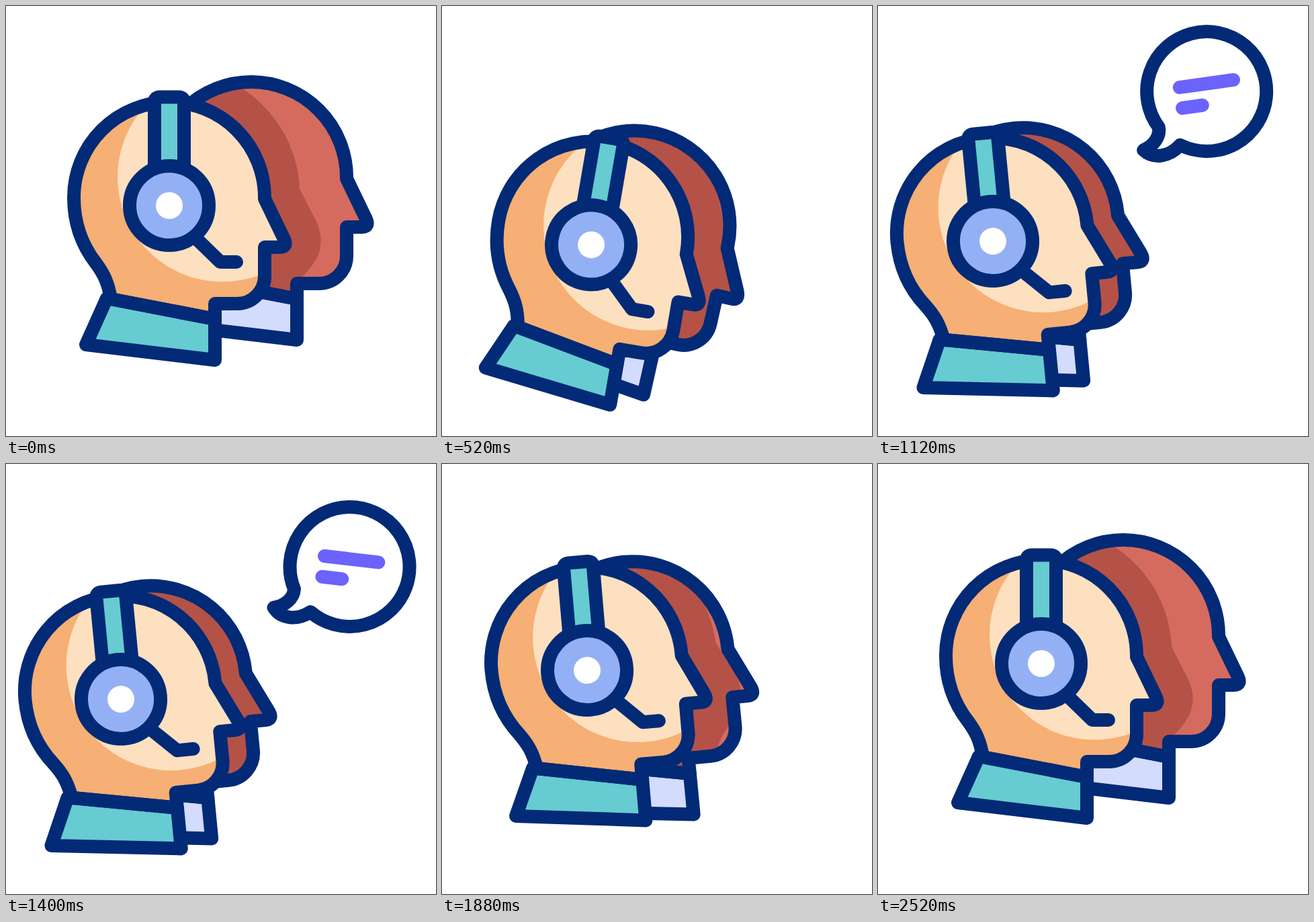
An HTML page for the animation above (3 s loop, 640 by 640 pixels).

```html
<!DOCTYPE html>
<html lang="en">
<head>
<meta charset="utf-8">
<title>Support call</title>
<style>
  html, body { margin: 0; width: 100%; height: 100%; overflow: hidden; background: #fff; }
  svg { display: block; width: 100%; height: 100%; }
  .line { fill: none; stroke: #032a76; stroke-width: 20; stroke-linecap: round; stroke-linejoin: round; }
  .text { stroke: #6b63fb; }
  .band { fill: #67cbd2; }
  .ear { fill: #94b0f4; }
</style>
</head>
<body>
<svg viewBox="0 0 640 640">
  <defs>
    <path id="head" d="M156 436C152 411 145 398 134 383C113 356 101 322 101 285A142 142 0 0 1 385 285V287L413 345Q420 359 408 359H385V402A41 41 0 0 1 344 443H311V466Z"/>
    <path id="collar" d="M150 435L311 466V527L119 504Z"/>
    <clipPath id="frontClip"><use href="#head"/></clipPath>
    <clipPath id="backClip"><use id="backShape" href="#head"/></clipPath>
  </defs>

  <g id="back">
    <use href="#collar" fill="#d3dcfd"/>
    <use href="#head" fill="#d56b5e"/>
  </g>
  <!-- The front head's shadow, kept inside the back head -->
  <g clip-path="url(#backClip)">
    <path id="shade" fill="#b45248" d="M250 93A187 187 0 0 1 437 272L463 323Q473 348 465 370Q458 386 442 402Q430 416 420 445L250 520L40 400V93Z"/>
  </g>
  <g id="backLine" class="line">
    <use href="#head"/>
    <use href="#collar"/>
  </g>

  <g id="front">
    <use href="#collar" fill="#67cbd2"/>
    <use href="#head" fill="#f6af74"/>
    <circle cx="322" cy="254.500" r="156" fill="#fce0bf" clip-path="url(#frontClip)"/>
    <g class="line">
      <use href="#head"/>
      <use href="#collar"/>
      <path class="band" d="M221 240V142Q222 135.500 229 135.500H257Q264 135.500 265 142V240Z"/>
      <path d="M283 346L319 381H343"/>
      <circle class="ear" cx="243" cy="297" r="59"/>
    </g>
    <circle cx="243" cy="297" r="20" fill="#fff"/>
  </g>

  <g id="bubble" class="line">
    <path d="M452 214A89 89 0 1 0 424 183C425 198 412 210 397 214C410 230 434 229 452 214Z"/>
    <path class="text" d="M463 129H544M463 160H493"/>
  </g>
</svg>
<script>
const LOOP = 3000, STEP = 40;
const DELAY = 112; // the back head follows the front one
const el = id => document.getElementById(id);
const clamp = (v, lo, hi) => Math.min(hi, Math.max(lo, v));

// Eased rise from 0 to 1 between two times.
function ramp(t, from, to) {
  const u = clamp((t - from) / (to - from), 0, 1);
  return u * u * (3 - 2 * u);
}

// Nod forward, tip back, then straighten up.
const nod = t => 13.4 * ramp(t, 0, 320) - 18.9 * ramp(t, 320, 1030) + 5.5 * ramp(t, 1740, 2410);

// Tip back and forth, starting and ending upright.
function swing(t) {
  const start = 830, end = 1362, period = 355;
  const phase = (clamp(t, start, end) - start) / period;
  const angle = -3.5 - 11 * Math.cos(2 * Math.PI * phase);
  return angle * ramp(t, start - 180, start) * (1 - ramp(t, end, end + 183));
}

function place(transform, ...ids) {
  for (const id of ids) el(id).setAttribute("transform", transform);
}

function draw(t) {
  const late = t - DELAY;
  const f = 53.4 * (ramp(t, 0, 475) - ramp(t, 1515, 2025));
  const b = ramp(late, 0, 475) - ramp(late, 1537, 1983);
  place(`translate(${-f} ${f}) rotate(${nod(t)} 230 490)`, "front", "shade");
  place(`translate(${-130 * b} ${68.5 * b}) rotate(${nod(late)} 352 460) translate(122 -30)`,
    "back", "backLine", "backShape");
  place(`rotate(${swing(t)} 400 227)`, "bubble");
  el("bubble").setAttribute("opacity", ramp(t, 640, 800) - ramp(t, 1560, 1720));
}

function tick() {
  const t = performance.now() % LOOP;
  draw(Math.floor(t / STEP) * STEP);
  requestAnimationFrame(tick);
}
tick();
</script>
</body>
</html>
```
